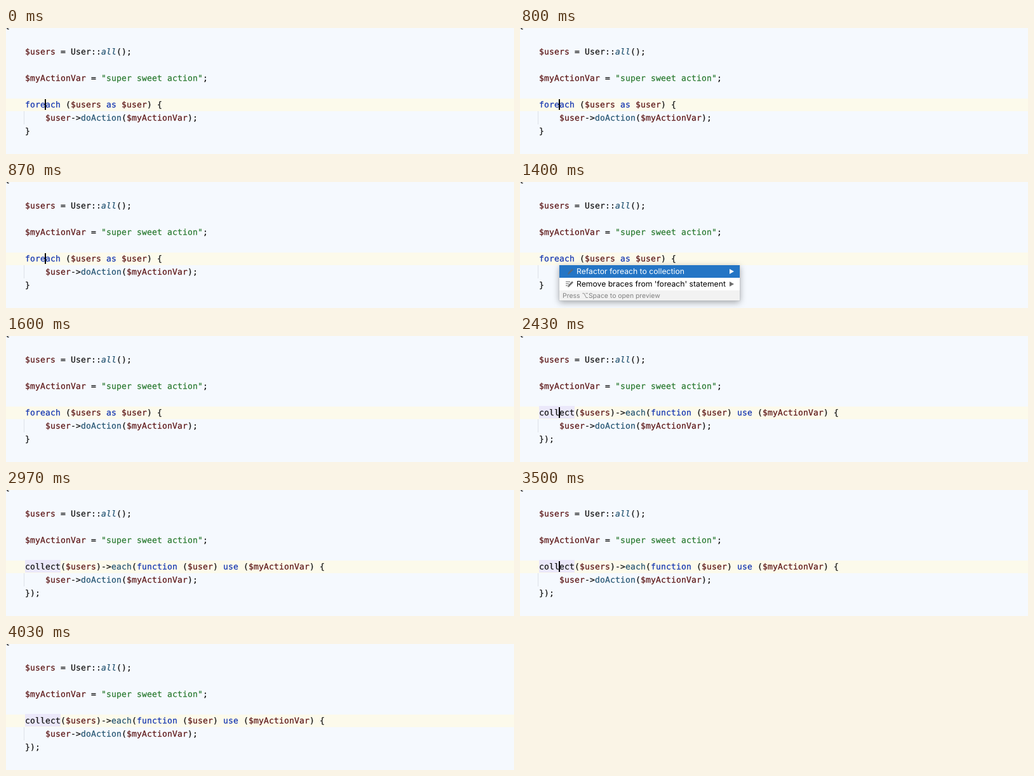
These frames come from a looping animation (800 by 200 pixels, 4060 ms). An HTML page with a canvas:

```html
<!DOCTYPE html>
<html lang="en">
<head>
<meta charset="utf-8">
<title>Refactor foreach to collection</title>
<style>
  html, body { margin: 0; width: 100%; height: 100%; overflow: hidden; background: #f5f9fe; }
  canvas { display: block; }
</style>
</head>
<body>
<canvas id="stage" width="800" height="200"></canvas>
<script>
const ctx = document.getElementById('stage').getContext('2d');
const LOOP = 4060;
const CELL = 8, LEFT = 30;
const MONO = '13px "DejaVu Sans Mono", monospace';
const UI = 'Inter, "DejaVu Sans", sans-serif';

const INK = '#161616', VAR = '#5c1616', KEY = '#1334b0', STR = '#2a7a30', CALL = '#245472';

// Times in ms
const POPUP = [970, 1600];
const REWRITE = 1700, COLORED = 2030;
const CARET_ON = [[0, 150], [650, 1000], [1640, 2650], [3150, 3650]];

// Unhinted glyphs, softly smoothed
ctx.textRendering = 'geometricPrecision';

const within = (t, [a, b]) => t >= a && t < b;

function rect(x, y, w, h, color) {
  ctx.fillStyle = color;
  ctx.fillRect(x, y, w, h);
}

function text(str, x, y, color, font) {
  ctx.font = font;
  ctx.fillStyle = color;
  ctx.fillText(str, x, y);
}

// Tokens are [text, color, italic]; each character sits in its own grid cell
function code(col, y, ...tokens) {
  ctx.lineWidth = 0.25;
  for (const [str, color = INK, italic] of tokens) {
    const font = (italic ? 'italic ' : '') + MONO;
    ctx.strokeStyle = color;
    for (const ch of str) {
      const x = LEFT + col++ * CELL;
      text(ch, x, y, color, font);
      ctx.strokeText(ch, x, y);
    }
  }
}

function arrow(x, y, color) {
  ctx.fillStyle = color;
  ctx.beginPath();
  ctx.moveTo(x, y - 4);
  ctx.lineTo(x + 7, y);
  ctx.lineTo(x, y + 4);
  ctx.fill();
}

function pencilIcon(x, y, color, lines) {
  if (lines) {
    rect(x, y - 4, 7, 1, color);
    rect(x, y - 1, 5, 1, color);
    rect(x, y + 2, 3, 1, color);
  }
  ctx.strokeStyle = color;
  ctx.lineWidth = 2.6;
  ctx.beginPath();
  ctx.moveTo(x + 5, y + 2.5);
  ctx.lineTo(x + 11, y - 3.5);
  ctx.stroke();
  ctx.fillStyle = color;
  ctx.beginPath();
  ctx.moveTo(x + 3, y + 5);
  ctx.lineTo(x + 4, y + 1.5);
  ctx.lineTo(x + 6.5, y + 4);
  ctx.fill();
}

function drawPopup() {
  const x = 62, y = 132, w = 284, h = 56;
  ctx.save();
  ctx.shadowColor = 'rgba(0,0,0,0.35)';
  ctx.shadowBlur = 10;
  ctx.shadowOffsetY = 3;
  rect(x, y, w, h, '#fff');
  ctx.restore();
  rect(x - 0.5, y, w + 1, h + 0.5, '#bcbfc3');
  rect(x, y, w, h, '#fff');
  rect(x, y, w, 20, '#2475c5');
  rect(x, y + 40, w, 16, '#f2f2f2');
  pencilIcon(72, 142, '#536880', false);
  pencilIcon(72, 162, '#6e6e6e', true);
  text('Refactor foreach to collection', 89, 146, '#fff', '12.2px ' + UI);
  text("Remove braces from 'foreach' statement", 89, 166, '#000', '12.2px ' + UI);
  text('Press ⌥Space to open preview', 67, 184, '#7f7f7f', '10.4px ' + UI);
  arrow(330, 142, '#fff');
  arrow(330, 162, '#6e6e6e');
}

function draw(t) {
  const done = t >= REWRITE, colored = !done || t >= COLORED;
  const call = colored ? CALL : INK;

  rect(0, 0, 800, 200, '#f5f9fe');
  rect(0, 112, 800, 20, '#fcfaeb');
  if (done && colored) rect(30, 111, 56, 20, '#ebe8fa');
  if (colored) rect(28, 132, 1, 21, '#dde2e8');

  code(-4, 0, ['{']);
  code(0, 42, ['$users', VAR], [' = User::'], ['all', CALL, true], ['();']);
  code(0, 84, ['$myActionVar', VAR], [' = '], ['"super sweet action"', STR], [';']);
  if (done) {
    code(0, 126, ['collect('], ['$users', VAR], [')->'], ['each', call], ['('],
      ['function', KEY], [' ('], ['$user', VAR], [') '], ['use', KEY], [' ('],
      ['$myActionVar', VAR], [') {']);
  } else {
    code(0, 126, ['foreach', KEY], [' ('], ['$users', VAR], [' as ', KEY],
      ['$user', VAR], [') {']);
  }
  code(4, 147, ['$user', VAR], ['->'], ['doAction', call], ['('],
    ['$myActionVar', VAR], [');']);
  code(0, 168, [done ? '});' : '}']);

  if (CARET_ON.some(span => within(t, span))) rect(61, 113, 2, 17, '#000');
  if (within(t, POPUP)) drawPopup();
}

const start = performance.now();
function tick() {
  draw((performance.now() - start) % LOOP);
  requestAnimationFrame(tick);
}
draw(0);
requestAnimationFrame(tick);
</script>
</body>
</html>
```
